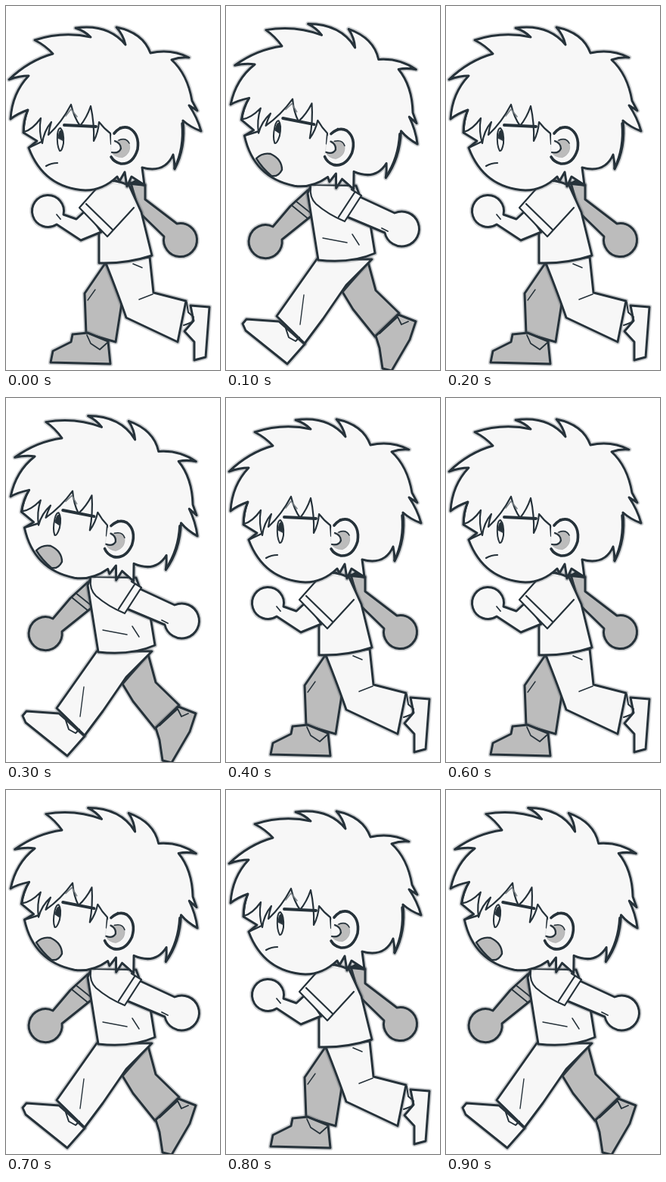
An HTML page with a canvas for the animation above (1 s loop, 283 by 480 pixels).

```html
<!DOCTYPE html>
<html lang="en">
<head>
<meta charset="utf-8">
<title>Running boy</title>
<style>
html, body { margin: 0; width: 100%; height: 100%; overflow: hidden; background: #fff; }
canvas { display: block; width: 283px; height: 480px; }
</style>
</head>
<body>
<canvas id="stage" width="283" height="480"></canvas>
<script>
const ctx = document.getElementById('stage').getContext('2d');
const INK = '#26323a', PALE = '#f7f7f7', GREY = '#bcbcbc';
const STEP = 100, LOOP = 1000;

ctx.lineJoin = 'round';
ctx.lineCap = 'round';

function shape(d, fill = PALE, width = 3) {
  const p = new Path2D(d);
  ctx.fillStyle = fill;
  ctx.fill(p);
  ctx.strokeStyle = INK;
  ctx.lineWidth = width;
  ctx.stroke(p);
}

function line(d, width = 2.2, color = INK) {
  ctx.strokeStyle = color;
  ctx.lineWidth = width;
  ctx.stroke(new Path2D(d));
}

// Dark outline with a soft edge around it
function outlined(d, fill) {
  line(d, 6.5, 'rgba(60,70,78,0.25)');
  shape(d, fill);
}

const HEAD = `M4 97 Q30 72 62 63 Q52 52 38 45 Q75 33 112 41 Q104 33 92 29
  Q135 23 158 51 Q155 38 146 28 Q181 35 191 62 Q218 56 242 68 Q230 67 219 71
  Q240 90 246 125 L253 138 L242 131 Q253 147 258 165 Q244 160 234 151
  Q238 187 223 215 Q223 205 221 196 Q210 221 180 213 L183 236 L166 225
  L160 238 L157 219 L150 231 L147 225 Q128 243 105 243 Q50 240 30 187
  L41 178 L23 167 Q23 150 29 137 Q15 142 6 149 Q8 115 30 92 Q18 92 4 97 Z`;

const FRINGE = `M29 137 Q23 155 24 166 Q35 163 46 148 Q43 165 48 181
  Q50 165 60 153 Q57 162 56 170 Q74 153 86 130 Q90 147 98 158
  Q107 147 112 132 Q117 155 116 178 Q122 167 123 153
  Q130 162 138 168 L139 182 Q143 168 151 160`;

function head() {
  outlined(HEAD);
  line(FRINGE);
  line('M47 179 L30 187', 2.4);
  line('M79 145 L86 136 L94 146', 1.6, '#7b8287');
  line('M77 157 L119 159', 4);
  shape('M68 169 Q69 161 72 161 Q77 166 76 181 Q74 192 71 191 Q67 184 68 169 Z', PALE, 2);
  shape('M69 174 Q70 163 73 164 Q76 170 75 177 Z', INK, 1);
  // Ear
  shape('M139 171 Q150 157 163 161 Q177 169 174 189 Q168 209 152 208 Q143 206 139 198 Z', PALE, 0.1);
  line('M143 168 Q152 157 163 161 Q177 169 174 189 Q168 209 152 208 Q143 206 139 199', 3.6);
  shape('M143 179 Q155 173 163 180 Q167 194 154 200 Q143 200 139 192 Q149 195 151 187 Q150 181 143 179 Z', GREY, 0.1);
  line('M144 178 Q152 181 152 188 Q149 195 140 193', 2.2);
  line('M149 177 Q159 173 163 181', 1.6);
  // Shaded tip at the back
  line('M233 155 Q236 187 223 214', 3.4);
}

function closedStride() {
  outlined('M165 233 L184 236 L184 255 L226 287 A22 22 0 1 1 209 304 L176 272 Z', GREY);

  outlined('M130 341 L104 379 L106 432 L145 443 L153 392 L142 340 Z', GREY);
  line('M118 374 L108 388', 1.4);
  outlined('M88 433 L108 431 L135 442 L138 472 L59 470 L62 455 L86 443 Z', GREY);
  line('M107 434 L112 445 L124 453 L134 444', 1.8);

  outlined('M244 395 L269 397 L264 463 L249 467 L249 443 L236 429 L248 415 Z');
  outlined('M132 339 L190 331 L195 378 L238 389 L227 443 L159 411 Q149 382 132 339 Z');
  line('M194 380 L176 387 M168 340 L180 345', 1.6);
  line('M239 391 L241 404 L248 410 L246 417 L235 421', 2);

  outlined('M122 233 Q142 226 163 237 L179 272 L193 329 Q160 340 123 339 L123 290 Z');

  outlined('M76 275 A21 21 0 1 0 67 288 L99 309 L126 298 L106 269 L93 281 Z');
  line('M67 275 L72 281', 1.8);
  shape('M128 233 L97 266 L134 304 Q153 285 172 264 L161 237 Z', PALE, 0.1);
  line('M146 230 Q130 231 122 238 L97 266 L134 304 L169 266 M106 261 L141 295');

  head();
  line('M53 211 Q60 207 68 207', 2.2);
  shape('M163 235 L172 229 L183 237 Z', INK, 1.5);
}

function openStride() {
  outlined('M108 243 L85 264 L62 291 A22 22 0 1 0 74 308 L114 276 Z', GREY);
  line('M87 263 L108 280 M92 257 L112 273', 1.8);

  outlined('M188 338 L198 375 L229 405 L197 436 L168 400 L154 377 Z', GREY);
  outlined('M228 407 L251 416 L243 440 L219 481 L207 478 L203 451 L198 435 Z', GREY);
  line('M203 432 L227 410 L232 420 L241 416', 1.8);

  outlined('M70 416 L27 413 L22 419 L26 428 L81 472 L104 446 Z');
  outlined('M120 334 L67 409 L104 445 L128 413 L159 368 L193 334 Z');
  line('M79 425 L83 437 L92 442 L97 437', 2);
  line('M98 420 L103 381', 1.4);

  outlined('M112 237 L108 247 L122 335 Q165 340 197 326 L191 289 L172 237 Z');
  line('M128 306 L160 312 M167 301 L176 315', 1.5);

  outlined('M169 248 L223 273 A23 23 0 1 1 210 299 L160 278 Z');
  line('M206 293 L214 297', 1.8);
  shape('M113 237 Q110 250 118 260 Q135 274 157 284 L179 250 L164 238 Z', PALE, 0.1);
  line('M112 239 Q110 252 119 261 Q135 275 157 284 L179 250 L166 242 M149 278 L170 246');

  ctx.save();
  ctx.translate(131.5, 81);
  ctx.rotate(8.3 * Math.PI / 180);
  ctx.translate(-123, -82.5);
  head();
  ctx.restore();
  shape('M40 201 Q48 193 59 195 Q74 202 74 216 Q69 226 60 224 Q48 214 40 201 Z', GREY, 2.4);
}

function draw(now) {
  const step = Math.floor((now % LOOP) / STEP);
  ctx.fillStyle = '#fff';
  ctx.fillRect(0, 0, 283, 480);
  if (step % 2) openStride();
  else closedStride();
}

let start;
function tick(now) {
  if (start === undefined) start = now;
  draw(now - start);
  requestAnimationFrame(tick);
}

draw(0);
requestAnimationFrame(tick);
</script>
</body>
</html>
```
